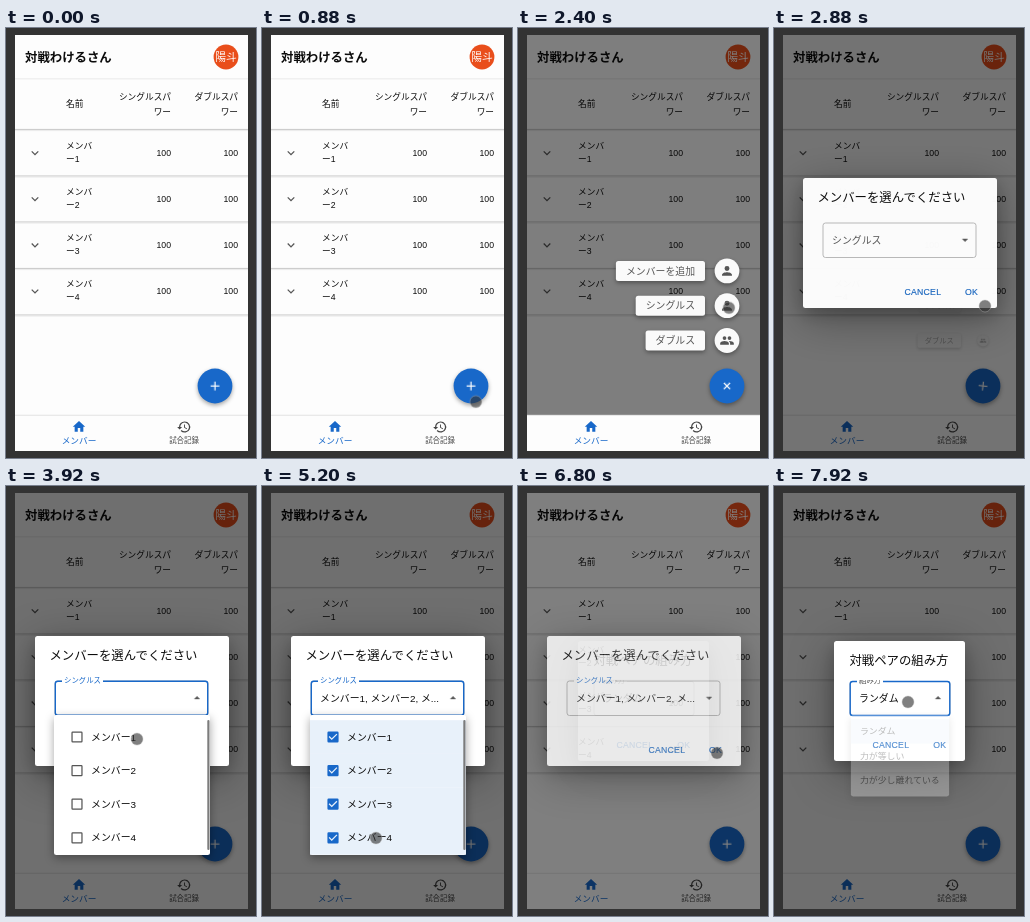
An HTML page for the animation above (8 s loop, 250 by 430 pixels).

```html
<!DOCTYPE html>
<html lang="ja">
<head>
<meta charset="utf-8">
<title>対戦わけるさん</title>
<style>
  html, body { margin: 0; width: 100%; height: 100%; overflow: hidden; background: #333; }
  svg { display: block; width: 100vw; height: 100vh; }
  text { font-family: "Liberation Sans", "Noto Sans CJK JP", "Noto Sans CJK", sans-serif; font-size: 8.7px; fill: #0c0c0c; }
  .end { text-anchor: end; }
  .mid { text-anchor: middle; }
  .big { font-size: 12.4px; }
  .body { font-size: 9.9px; }
  .small { font-size: 7.45px; }
  .btn { letter-spacing: .25px; fill: #1565c0; stroke: #1565c0; stroke-width: .15; }
  .blue { fill: #1868c9; }
  .grey { fill: #555; }
  .box { fill: none; stroke: #aaa; stroke-width: .8; }
  .focus { fill: none; stroke: #1868c9; stroke-width: 1.4; }
  .dialog { fill: #fff; filter: drop-shadow(0 6px 8px rgba(0,0,0,.2)) drop-shadow(0 10px 22px rgba(0,0,0,.35)); }
  .paper { fill: #fff; filter: drop-shadow(0 3px 5px rgba(0,0,0,.35)); }
  .lift { filter: drop-shadow(0 2px 2px rgba(0,0,0,.35)); }
</style>
</head>
<body>
<svg id="stage" viewBox="0 0 250 430"></svg>
<script>
const LOOP = 8000;
const EASE = 'cubic-bezier(.4,0,.2,1)';
const OUT = 'cubic-bezier(0,0,.2,1)';
const UNIT = .621;
const members = [1, 2, 3, 4];

// ---- drawing helpers ----
const text = (x, y, str, cls = '') => `<text x="${x}" y="${y}" class="${cls}">${str}</text>`;
const rect = (x, y, w, h, attrs = '') => `<rect x="${x}" y="${y}" width="${w}" height="${h}" ${attrs}/>`;
const icon = (cx, cy, d, fill) =>
  `<path transform="translate(${cx} ${cy}) scale(${UNIT}) translate(-12 -12)" d="${d}" fill="${fill}"/>`;
const group = (attrs, ...parts) => `<g ${attrs}>${parts.join('')}</g>`;

const ICON = {
  more: 'M16.59 8.59 12 13.17 7.41 8.59 6 10l6 6 6-6z',
  plus: 'M19 13h-6v6h-2v-6H5v-2h6V5h2v6h6z',
  home: 'M10 20v-6h4v6h5v-8h3L12 3 2 12h3v8z',
  history: 'M13 3a9 9 0 0 0-9 9H1l3.9 4L9 12H6a7 7 0 1 1 2.06 4.94l-1.42 1.42A9 9 0 1 0 13 3zm-1 5v5l4.28 2.54.72-1.21-3.5-2.08V8z',
  person: 'M12 12a4 4 0 1 0 0-8 4 4 0 0 0 0 8zm0 2c-2.7 0-8 1.3-8 4v2h16v-2c0-2.7-5.3-4-8-4z',
  people: 'M16 11a3 3 0 1 0 0-6 3 3 0 0 0 0 6zM8 11a3 3 0 1 0 0-6 3 3 0 0 0 0 6zm0 2c-2.3 0-7 1.2-7 3.5V19h14v-2.5C15 14.2 10.3 13 8 13zm8 0-1 .1c1.2.8 2 2 2 3.4V19h6v-2.5C23 14.2 18.3 13 16 13z',
  down: 'M7 10l5 5 5-5z',
  up: 'M7 14l5-5 5 5z',
  empty: 'M19 5v14H5V5zm0-2H5a2 2 0 0 0-2 2v14a2 2 0 0 0 2 2h14a2 2 0 0 0 2-2V5a2 2 0 0 0-2-2z',
  tick: 'M19 3H5a2 2 0 0 0-2 2v14a2 2 0 0 0 2 2h14a2 2 0 0 0 2-2V5a2 2 0 0 0-2-2zm-9 14-5-5 1.41-1.41L10 14.17l7.59-7.59L19 8z'
};

const row = n => {
  const y = 125 + (n - 1) * 46.1;
  return icon(29, y, ICON.more, '#555') +
    text(60, y - 4, 'メンバ') + text(60, y + 9, `ー${n}`) +
    text(165, y + 3, '100', 'end') + text(232, y + 3, '100', 'end');
};

const divider = y => rect(9, y - .6, 233, 1.2, 'fill="#cdcdcd"') + rect(9, y + .6, 233, 1, 'fill="#ebebeb"');

const actions = [
  { label: 'ダブルス', shape: ICON.people },
  { label: 'シングルス', shape: ICON.person },
  { label: 'メンバーを追加', shape: ICON.person }
].map((a, i) => ({ ...a, y: 312.5 - i * 34.8 }));

const action = ({ label, shape, y }, i) => {
  const w = label.length * 9.9 + 19.8;
  return group(`id="label${i}"`,
      rect(187 - w, y - 10, w, 20, 'rx="2.5" fill="#fafafa" class="lift"'),
      text(187 - w / 2, y + 3.6, label, 'mid body grey')) +
    group(`id="action${i}"`,
      `<circle cx="209" cy="${y}" r="12.4" fill="#fafafa" class="lift"/>`,
      icon(209, y, shape, '#555'));
};

const option = n => {
  const y = 251 + (n - 1) * 33.6;
  return icon(71, y, ICON.empty, '#555') +
    group(`id="check${n}"`,
      rect(48, y - 16.8, 156, 33.7, 'fill="#e8f1fa"'),
      icon(71, y, ICON.tick, '#1868c9')) +
    text(85, y + 3.5, `メンバー${n}`, 'body');
};

const screen = 'x="9" y="7" width="233" height="416"';

document.getElementById('stage').innerHTML = [
  `<defs>
    <clipPath id="clip1"><rect x="40" y="191" width="180" height="60"/></clipPath>
    <clipPath id="clip2"><rect x="70" y="194" width="115" height="60"/></clipPath>
    <clipPath id="clipPage"><rect ${screen}/></clipPath>
  </defs>`,
  rect(0, 0, 250, 430, 'fill="#333"'),
  `<rect ${screen} fill="#fdfdfd"/>`,
  text(19, 33.5, '対戦わけるさん', 'big" font-weight="700'),
  '<circle cx="220" cy="29" r="12.4" fill="#e94e1b"/>',
  text(220, 33, '陽斗', 'mid" style="fill:#fff;font-size:10.8px'),
  rect(9, 50.5, 233, .8, 'fill="#e4e4e4"'),
  text(60, 79, '名前'),
  text(165, 72, 'シングルスパ', 'end'), text(165, 87, 'ワー', 'end'),
  text(232, 72, 'ダブルスパ', 'end'), text(232, 87, 'ワー', 'end'),
  ...members.map(row),
  ...[101.5, 148, 194, 240.5, 287].map(divider),

  `<rect id="dialShade" ${screen}/>`,
  rect(9, 387, 233, 36, 'fill="#fdfdfd"'),
  rect(9, 386.8, 233, .8, 'fill="#ddd"'),
  icon(73, 398.7, ICON.home, '#1868c9'),
  text(73, 415.5, 'メンバー', 'mid blue'),
  icon(178, 399, ICON.history, '#444'),
  text(178, 415, '試合記録', 'mid small" style="fill:#444'),
  ...actions.map(action),
  '<circle cx="209" cy="358" r="17.4" class="blue lift"/>',
  group('id="plus"', icon(209, 358, ICON.plus, '#fff')),

  `<rect id="shade1" ${screen}/><rect id="shade2" ${screen}/>`,
  group('id="dialog1"',
    group('clip-path="url(#clipPage)"', rect(29, 150, 194, 130, 'rx="2.5" class="dialog"')),
    text(43.4, 174, 'メンバーを選んでください', 'big'),
    rect(49, 195, 153, 34.5, 'rx="2.5" class="box"'),
    rect(49.3, 195.3, 152.4, 34, 'rx="2.5" class="focus" id="focus1"'),
    rect(56, 193.5, 41, 3, 'fill="#fff" id="notch"'),
    group('clip-path="url(#clip1)"', group('id="fieldLabel"', text(0, 0, 'シングルス', 'body" id="fieldText'))),
    text(58, 215.5, 'メンバー1', 'body" id="value1'),
    text(58, 215.5, 'メンバー1, メンバー2', 'body" id="value2'),
    text(58, 215.5, 'メンバー1, メンバー2, メ...', 'body" id="value3'),
    group('id="down1"', icon(191, 212, ICON.down, '#555')),
    group('id="up1"', icon(191, 212, ICON.up, '#555')),
    text(130.5, 266.5, 'CANCEL', 'btn'), text(191, 266.5, 'OK', 'btn')),

  group('id="menu1"',
    rect(48, 229, 156, 140, 'rx="2.5" class="paper"'),
    ...members.map(option),
    rect(201.3, 234, 2.2, 130, 'rx="1.1" fill="#7c7c7c"')),

  group('id="dialog2"',
    group('clip-path="url(#clipPage)"', rect(60, 155, 131, 120, 'rx="2.5" class="dialog"')),
    text(75.4, 179, '対戦ペアの組み方', 'big'),
    rect(76, 195.5, 100, 34, 'rx="2.5" class="box"'),
    rect(76.2, 195.5, 99.6, 34, 'rx="2.5" class="focus" id="focus2"'),
    rect(83, 194, 26, 3, 'fill="#fff"'),
    group('clip-path="url(#clip2)"', text(85, 196.7, '組み方', 'small grey')),
    text(85, 216, 'ランダム', 'body'),
    group('id="down2"', icon(164, 212, ICON.down, '#555')),
    group('id="up2"', icon(164, 212, ICON.up, '#555')),
    text(98.5, 261.5, 'CANCEL', 'btn'), text(159.3, 261.5, 'OK', 'btn')),

  group('id="menu2"',
    rect(71.5, 229, 109, 99, 'rx="2.5" class="paper"'),
    rect(71.5, 234, 109, 29.8, 'fill="#e8f1fa"'),
    ...['ランダム', '力が等しい', '力が少し離れている'].map((s, i) => text(81.5, 252.5 + i * 29.8, s, 'body'))),

  group('clip-path="url(#clipPage)"',
    '<circle id="pointer" r="6" fill="rgba(50,50,50,.62)" stroke="rgba(190,190,190,.5)" stroke-width=".8"/>')
].join('');

// ---- motion helpers: keys are [ms, value, easing to the next key] ----
function track(id, prop, keys, origin) {
  const el = document.getElementById(id);
  if (origin) el.style.transformOrigin = origin;
  const all = [[0, keys[0][1]], ...keys, [LOOP, keys[keys.length - 1][1]]];
  el.animate(
    all.map(([ms, value, easing = 'linear']) => ({ offset: ms / LOOP, [prop]: value, easing })),
    { duration: LOOP, iterations: Infinity });
}

const pulse = (id, prop, off, on, start, end, inMs, outMs, origin) => track(id, prop, [
  [start, off, EASE], [start + inMs, on],
  ...(end ? [[end, on, EASE], [end + outMs, off]] : [])
], origin);

const fade = (id, start, end, max = 1) => pulse(id, 'opacity', 0, max, start, end, 225, 195);

const show = (id, start, end = LOOP) => track(id, 'opacity',
  [[start, 0], [start, 1], [end, 1], [end, 0]]);

const hide = (id, start, end = LOOP) => track(id, 'opacity',
  [[start, 1], [start, 0], [end, 0], [end, 1]]);

// ---- timeline ----
const T = { dial: 1590, dialog: 2702, dialEnd: 2750, open: 3500, close: 5860, ok: 6757, open2: 7847 };
const checkAt = [4100, 4420, 4760, 5110];
const SHADE = .56;

fade('dialShade', T.dial - 7, T.dialog, .5);
pulse('plus', 'transform', 'rotate(0deg)', 'rotate(45deg)', T.dial, T.dialEnd, 225, 225, '209px 358px');
actions.forEach(({ y }, i) => {
  const start = T.dial + 8 + i * 30, end = T.dialEnd + (2 - i) * 30;
  pulse(`label${i}`, 'opacity', 0, 1, start, end, 195, 195);
  pulse(`label${i}`, 'transform', 'scale(.5)', 'scale(1)', start, end, 195, 195, `187px ${y}px`);
  pulse(`action${i}`, 'opacity', 0, 1, start, end, 195, 195);
  pulse(`action${i}`, 'transform', 'scale(0)', 'scale(1)', start, end, 195, 195, `209px ${y}px`);
});

fade('shade1', T.dialog, T.ok, SHADE);
fade('dialog1', T.dialog, T.ok);
fade('shade2', T.ok, 0, SHADE);
fade('dialog2', T.ok, 0);

show('focus1', T.open, 6640);
show('up1', T.open, T.close);
hide('down1', T.open, T.close);
track('notch', 'opacity', [[T.open, 0], [T.open + 100, 1]]);
track('fieldLabel', 'transform', [
  [T.open, 'translate(58px,215.5px) scale(1)', OUT],
  [T.open + 200, 'translate(58px,197.3px) scale(.75)']
], '0 0');
track('fieldText', 'fill', [[T.open, '#555', OUT], [T.open + 200, '#1868c9']]);

const small = 'scale(.75,.5625)';
pulse('menu1', 'opacity', 0, 1, T.open, T.close, 290, 290);
track('menu1', 'transform', [
  [T.open, small, EASE], [T.open + 193, 'scale(1,1)'],
  [T.close + 97, 'scale(1,1)', EASE], [T.close + 290, small]
], '126px 229px');
track('menu2', 'opacity', [[T.open2, 0], [T.open2 + 73, .27], [LOOP, .87]]);
track('menu2', 'transform', [
  [T.open2, small], [T.open2 + 73, 'scale(.9,.82)'], [LOOP, 'scale(.99,.98)']
], '126px 229px');

checkAt.forEach((ms, i) => show(`check${i + 1}`, ms));
show('value1', checkAt[0], checkAt[1]);
show('value2', checkAt[1], checkAt[2]);
show('value3', checkAt[2]);

show('focus2', 7800);
show('up2', T.open2);
hide('down2', T.open2);

const glide = 'ease-in-out';
track('pointer', 'transform', [
  [300, 236, 432], [1200, 206, 353], [1760, 206, 353], [2480, 211, 278],
  [2920, 211, 278], [3400, 133, 216], [3560, 133, 216], [3900, 131, 253],
  [4120, 130, 254], [4360, 125, 286], [4460, 125, 286], [4700, 120, 319],
  [4800, 120, 319], [5060, 114, 352], [5280, 114, 352], [5700, 112, 389],
  [5940, 112, 389], [6600, 199, 267], [6900, 199, 267], [7640, 134, 216]
].map(([ms, x, y]) => [ms, `translate(${x}px,${y}px)`, glide]));
</script>
</body>
</html>
```
